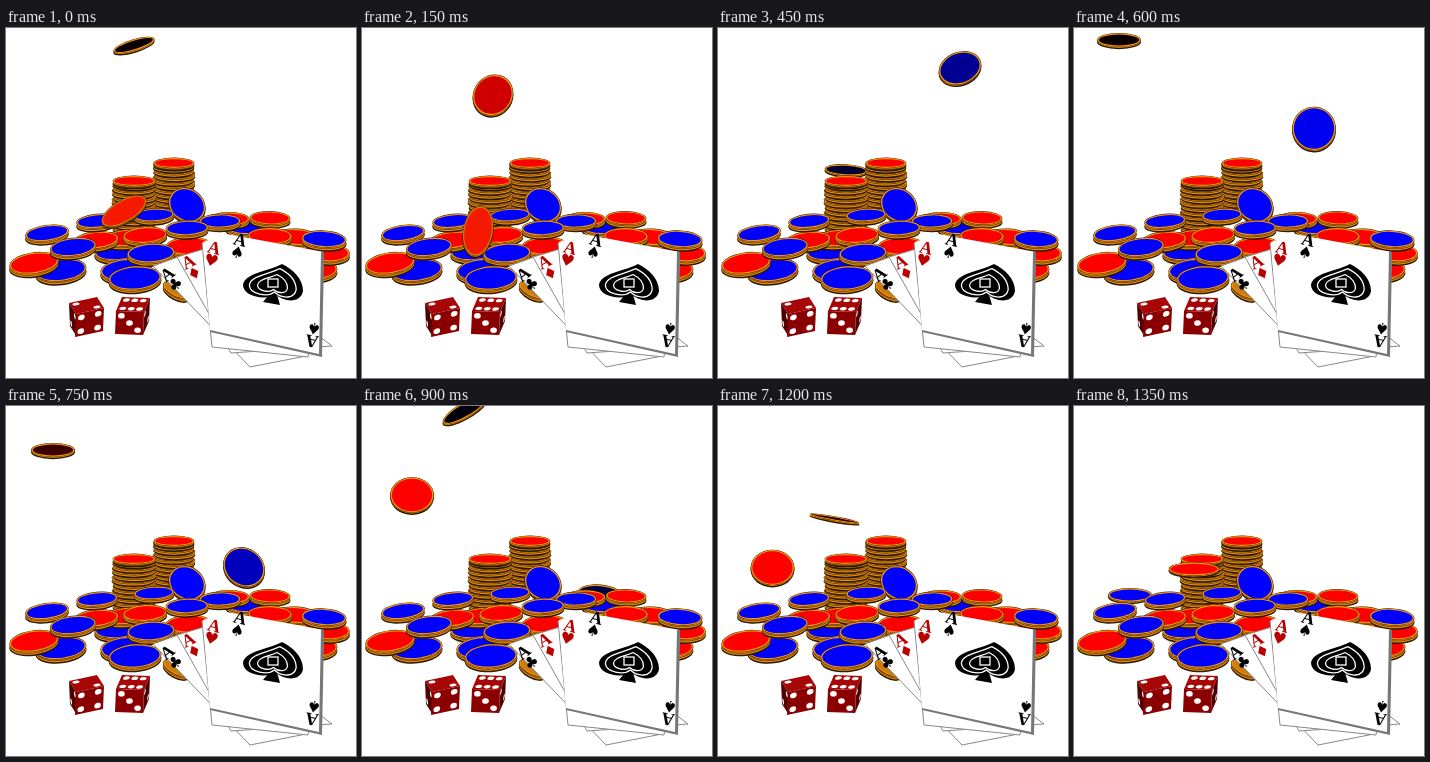
These frames come from a looping animation (350x350 px, 1.5 s). An HTML page with a canvas:

```html
<!DOCTYPE html>
<html lang="en">
<head>
<meta charset="utf-8">
<title>Falling poker chips</title>
<style>
html, body { margin: 0; width: 100%; height: 100%; overflow: hidden; background: #fff; }
canvas { display: block; width: 350px; height: 350px; }
</style>
</head>
<body>
<canvas id="stage" width="350" height="350"></canvas>
<script>
const ctx = document.getElementById('stage').getContext('2d');
const RED = [255, 0, 0], BLUE = [0, 0, 255], AMBER = [205, 125, 15];
const GOLD = '#f09410', DARK = '#2a1700';
const STEP = 150, STEPS = 10;
const rad = deg => deg * Math.PI / 180;
const tone = (color, light = 1) => `rgb(${color.map(c => Math.round(c * light))})`;

function oval(x, y, rx, ry, tilt, fill) {
  ctx.beginPath();
  ctx.ellipse(x, y, Math.max(1, rx), Math.max(1, ry), rad(tilt), 0, Math.PI * 2);
  ctx.fillStyle = fill;
  ctx.fill();
}

function poly(points, fill, line, width = 1) {
  ctx.beginPath();
  points.forEach(([x, y]) => ctx.lineTo(x, y));
  ctx.closePath();
  ctx.fillStyle = fill;
  ctx.fill();
  if (line) {
    ctx.strokeStyle = line;
    ctx.lineWidth = width;
    ctx.stroke();
  }
}

function chip(x, y, rx, ry, tilt, face, thick = 4) {
  oval(x, y + thick, rx + .5, ry + .5, tilt, DARK);
  for (let d = thick - 1; d > 0; d--) oval(x, y + d, rx, ry, tilt, d % 2 ? GOLD : '#7a4604');
  oval(x, y, rx + .4, ry + .4, tilt, DARK);
  oval(x, y, rx, ry, tilt, GOLD);
  oval(x, y, rx - 1.4, ry - 1.2, tilt, face);
}

function stack(x, top, bottom, rx) {
  for (let y = bottom; y > top; y -= 4.4) {
    chip(x + Math.sin(y * 2.3) * .9, y, rx, 5, 0, '#b96a08', 4);
  }
  chip(x, top, rx, 5, 0, tone(RED), 3);
}

// Chips lying nearer look larger and rounder, and lean with their side of the pile.
function lay(color, places) {
  for (const [x, y] of places) {
    const rx = 20 + (y - 190) * .1;
    chip(x, y, rx, rx * (.33 + (y - 190) * .002), (x - 230) * .04, tone(color));
  }
}

function pile() {
  chip(181, 177, 19, 16, 35, tone(BLUE), 2);
  lay(BLUE, [[241, 199], [112, 223], [120, 242], [55, 242]]);
  lay(RED, [[223, 191], [264, 190], [290, 209], [264, 208], [306, 240], [320, 224],
            [120, 210], [90, 212], [139, 207], [183, 218], [28, 235]]);
  lay(BLUE, [[214, 193], [318, 211], [148, 187], [91, 193], [181, 200], [41, 205],
             [67, 219], [145, 225], [129, 250]]);
  chip(170, 262, 14, 6, 28, tone(AMBER));
}

// Die face spanned by edges u and v from corner o.
function face(o, u, v, count, fill) {
  ctx.save();
  ctx.transform(...u, ...v, ...o);
  ctx.fillStyle = fill;
  ctx.fillRect(0, 0, 1, 1);
  const spots = [];
  if (count % 2) spots.push([.5, .5]);
  if (count > 1) spots.push([.2, .2], [.8, .8]);
  if (count > 3) spots.push([.8, .2], [.2, .8]);
  if (count > 5) spots.push([.5, .2], [.5, .8]);
  spots.forEach(([x, y]) => oval(x, y, 0, 0, 0, 'transparent'));
  ctx.fillStyle = '#fff';
  for (const [x, y] of spots) {
    ctx.beginPath();
    ctx.arc(x, y, .12, 0, Math.PI * 2);
    ctx.fill();
  }
  ctx.restore();
}

function die(o, u, v, side, counts) {
  const [x, y] = o;
  const far = side > 0 ? [x + u[0], y + u[1]] : o;
  face([x + v[0], y + v[1]], u, [-v[0], -v[1]], counts[0], '#a80606');
  face(far, v, [-side, 23], counts[1], '#500000');
  face(o, u, [-1, 23], counts[2], '#8a0000');
}

function glyph(text, x, y, size, rot, color) {
  ctx.save();
  ctx.translate(x, y);
  ctx.rotate(rad(rot));
  ctx.font = `bold ${size}px ${text === 'A' ? '"Liberation Serif", serif' : '"DejaVu Sans", sans-serif'}`;
  ctx.textAlign = 'center';
  ctx.textBaseline = 'middle';
  ctx.fillStyle = color;
  ctx.fillText(text, 0, 0);
  ctx.restore();
}

function spade(size) {
  ctx.save();
  ctx.scale(size, size);
  ctx.beginPath();
  ctx.moveTo(10, -21);
  ctx.bezierCurveTo(20, -16, 31, -7, 31, 6);
  ctx.bezierCurveTo(29, 18, 13, 18, 3, 9);
  ctx.bezierCurveTo(-5, 16, -29, 12, -29, 0);
  ctx.bezierCurveTo(-27, -12, -6, -13, 10, -21);
  ctx.restore();
}

function bigSpade() {
  ctx.save();
  ctx.translate(266, 257);
  poly([[0, 6], [4, 6], [8, 20], [-9, 17]], '#000');
  spade(1);
  ctx.fill();
  ctx.strokeStyle = '#fff';
  ctx.lineWidth = 1.3;
  for (const size of [.78, .5]) {
    spade(size);
    ctx.stroke();
  }
  ctx.strokeRect(-4, -6, 10, 8);
  ctx.restore();
}

function index(suit, x, y, rot, color) {
  glyph('A', x, y, 18, rot, color);
  const down = rad(rot + 90);
  glyph(suit, x + Math.cos(down) * 13, y + Math.sin(down) * 13, 16, rot, color);
}

function cards() {
  const edge = '#888', red = '#b80000';
  poly([[147, 238], [172, 229], [300, 328], [244, 339]], '#fff', edge);
  poly([[171, 229], [198, 221], [326, 318], [225, 325]], '#fff', edge);
  poly([[196, 215], [222, 210], [317, 230], [302, 329], [206, 319]], '#fff', edge);
  poly([[197, 214], [221, 206], [318, 224], [314, 328], [204, 303]], '#fff');
  poly([[318, 224], [318, 230], [316, 329], [204, 304], [204, 302], [313, 326], [315, 224]], '#777');
  index('♣', 162, 247, -38, '#000');
  index('♦', 183, 235, -27, red);
  index('♥', 208, 221, 14, red);
  index('♠', 234, 213, 14, '#000');
  bigSpade();
  index('♠', 306, 312, 190, '#000');
}

// path: places on steps 0, 1, 3 and the last; spin: first angle and turn per step;
// roll: parabola of the tilt; lit: step from which the face is in full light.
const flights = [
  { start: 0, last: 3, r: 21, spin: [15, 50], roll: [19, -.3, 2.95], faces: [RED, BLUE], flip: 2, lit: 9,
    path: [[128, 17], [131, 67], [128, 142], [128, 142]] },
  { start: 2, last: 4, r: 21.5, spin: [10, 37], roll: [-19.5, 1.33, 4.1], faces: [BLUE, BLUE], flip: 9, lit: 9,
    path: [[246, 1], [242, 40], [238, 161], [238, 187]] },
  { start: 4, last: 5, r: 21.5, spin: [-18, 36], roll: [0, 0, 0], faces: [RED, BLUE], flip: 5, lit: 2,
    path: [[45, 12], [47, 44], [53, 134], [56, 189]] },
  { start: 6, last: 5, r: 25, spin: [-16.5, 10.5], roll: [-10, 1, 3], faces: [BLUE, RED], flip: 2, lit: 3,
    path: [[103, 4], [113, 62], [120, 163], [116, 203]] }
];

function place(path, k, last) {
  const times = [0, 1, 3, last];
  const i = k < 1 ? 0 : k < 3 ? 1 : 2;
  const t = (k - times[i]) / (times[i + 1] - times[i] || 1);
  return path[i].map((from, axis) => from + (path[i + 1][axis] - from) * t);
}

function fly(f, step) {
  const k = (step - f.start + STEPS) % STEPS;
  if (k > f.last) return;
  const [x, y] = place(f.path, k, f.last);
  const open = Math.abs(Math.sin(rad(f.spin[0] + f.spin[1] * k)));
  const [bend, a, b] = f.roll;
  const light = k >= f.lit ? 1 : k ? open * open * .8 + .15 : .04;
  ctx.globalAlpha = f.r > 24 && k > 3 ? .8 : 1;
  chip(x, y, f.r, f.r * open, bend * (k - a) * (k - b), tone(f.faces[+(k >= f.flip)], light), 2);
  ctx.globalAlpha = 1;
}

function draw(now) {
  const step = Math.floor(now / STEP) % STEPS;
  ctx.fillStyle = '#fff';
  ctx.fillRect(0, 0, 350, 350);
  flights.slice(0, 3).forEach(f => fly(f, step));
  stack(168, 135, 176, 20);
  stack(128, 153, 198, 21);
  pile();
  fly(flights[3], step);
  die([70, 286], [28, -6], [-7, -11], -1, [2, 2, 4]);
  die([110, 283], [28, 1], [6, -14], 1, [6, 2, 3]);
  cards();
}

let start;
function tick(now) {
  start ??= now;
  draw(now - start);
  requestAnimationFrame(tick);
}
draw(0);
requestAnimationFrame(tick);
</script>
</body>
</html>
```
